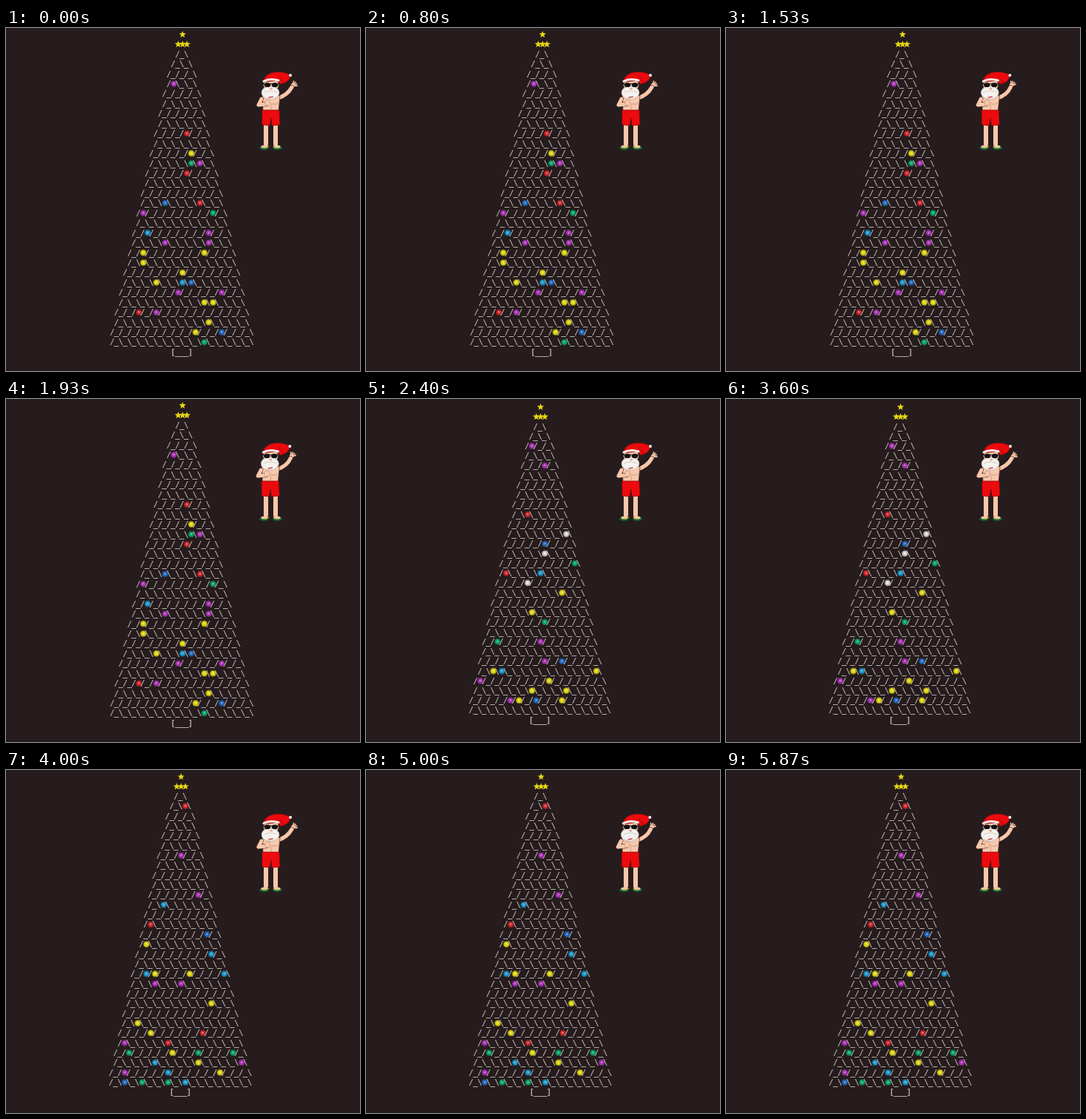
Write an HTML page with a canvas that moves like this. It is 478 by 464 pixels and loops after 5990 ms.

```html
<!DOCTYPE html>
<html lang="en">
<head>
<meta charset="utf-8">
<title>Christmas tree</title>
<style>
  html, body { margin: 0; width: 100%; height: 100%; overflow: hidden; background: #261c1d; }
  canvas { display: block; }
</style>
</head>
<body>
<canvas id="stage" width="478" height="464"></canvas>
<script>
const ctx = document.getElementById('stage').getContext('2d');
const LOOP = 5990, TREE_TIME = 2000, WAVE = 400;
const ROWS = 30, BAUBLE_CHANCE = 0.115;
const TEXT = '#b5acab', SKIN = '#f6c8ad', SHADE = '#c98e72', LINE = '#4a2318';
const RED = '#ec0a0e', WHITE = '#f4f1ee';

// Hue, saturation and lightness; yellow hangs most often
const YELLOW = [57, 85, 46], SKY = [198, 74, 44], BLUE = [213, 67, 43], GREEN = [157, 75, 34],
  RED_BALL = [358, 68, 46], PURPLE = [295, 55, 44], SILVER = [340, 6, 80];
const HUES = [YELLOW, YELLOW, YELLOW, YELLOW, SKY, SKY, PURPLE, PURPLE, PURPLE,
  GREEN, GREEN, RED_BALL, RED_BALL, BLUE, SILVER];

const TREES = [
  { seed: 11, x: 238.4, y: 35.2, pitch: 13.44 },
  { seed: 24, x: 235.7, y: 37, pitch: 13.24 },
  { seed: 37, x: 236.4, y: 35.4, pitch: 13.35 }
];

function seeded(seed) {
  return () => {
    seed = (seed + 0x6d2b79f5) | 0;
    let n = Math.imul(seed ^ (seed >>> 15), seed | 1);
    n ^= n + Math.imul(n ^ (n >>> 7), n | 61);
    return ((n ^ (n >>> 14)) >>> 0) / 2 ** 32;
  };
}

function ellipse(x, y, rx, ry, fill, line) {
  ctx.beginPath();
  ctx.ellipse(x, y, rx, ry, 0, 0, Math.PI * 2);
  ctx.fillStyle = fill;
  ctx.fill();
  if (line) {
    ctx.strokeStyle = line;
    ctx.lineWidth = 0.7;
    ctx.stroke();
  }
}

function star(x, y) {
  ctx.beginPath();
  for (let i = 0; i < 10; i++) {
    const r = i % 2 ? 2.1 : 4.9, a = i * Math.PI / 5;
    ctx.lineTo(x + r * Math.sin(a), y - r * Math.cos(a));
  }
  ctx.fillStyle = '#e6d814';
  ctx.fill();
}

function bauble(x, y, [h, s, l]) {
  const tone = k => `hsl(${h} ${s}% ${l * k}%)`;
  ellipse(x, y, 4.5, 4.5, tone(0.55));
  ellipse(x, y, 3.5, 3.5, tone(1));
  ellipse(x, y - 0.3, 1.4, 1.4, tone(1.45));
}

function drawTree({ seed, x, y, pitch }) {
  const random = seeded(seed), cell = pitch * 0.438;
  const put = (char, col, rowY) => {
    ctx.fillStyle = TEXT;
    ctx.fillText(char, x - 1 + col * cell, rowY + 3.5);
  };
  ctx.font = 'bold 11px "DejaVu Sans Mono", monospace';
  ctx.textAlign = 'center';

  star(x, y - 2 * pitch + 0.5);
  for (const col of [-1, 0, 1]) star(x + col * cell, y - pitch + 0.3);

  for (let row = 1; row <= ROWS; row++) {
    const edge = row === 1 ? 1 : Math.floor((row + 3) / 2);
    const rowY = y + (row - 1) * pitch;
    const slash = row % 2 ? '/' : '\\';
    put('/', -edge, rowY);
    for (let col = 1 - edge; col < edge; col++) {
      if ((col + edge) % 2 === 0) put(slash, col, rowY);
      else if (random() > BAUBLE_CHANCE) put('_', col, rowY);
      else bauble(x + col * cell, rowY, HUES[Math.floor(random() * HUES.length)]);
    }
    put('\\', edge, rowY);
  }
  [...'[___]'].forEach((char, i) => put(char, i - 2, y + ROWS * pitch));
}

function shape(path, fill, line = LINE, width = 0.7) {
  const p = new Path2D(path);
  if (fill) {
    ctx.fillStyle = fill;
    ctx.fill(p);
  }
  ctx.strokeStyle = line;
  ctx.lineWidth = width;
  ctx.stroke(p);
}

function limb(path, width) {
  shape(path, null, LINE, width + 1);
  shape(path, null, SKIN, width);
}

function hand(x, y, turn) {
  ctx.save();
  ctx.translate(x, y);
  ctx.rotate(turn);
  for (let i = -1; i <= 2; i++) {
    ctx.save();
    ctx.rotate(i * 0.45);
    limb('M0 0L0 -6', 1.7);
    ctx.restore();
  }
  ellipse(0, -1, 2.8, 3, SKIN);
  ctx.restore();
}

function drawSanta(raised) {
  ctx.save();
  ctx.lineJoin = ctx.lineCap = 'round';

  for (const side of [-1, 1]) {
    const x = 357.5 + side * 6.5;
    ellipse(x + side * 2.5, 162, 6.5, 3, '#1d6a35', '#123d21');
    limb(`M${x} 130L${x} 157`, 6);
    ellipse(x + side * 2, 160.5, 4.5, 2, SKIN);
    shape(`M${x - 3} 160L${x + side * 2} 162L${x + 4} 160`, null, '#d9c23a', 1);
  }
  if (raised) ctx.translate(-0.7, 0);

  // Torso, arms and shorts
  hand(raised ? 386 : 387, 78, raised ? 0.35 : 0.7);
  limb(`M367 95Q380 91 ${raised ? 385 : 386} 80`, 5);
  shape('M346 92L347 113L368 113L370 92Z', SKIN);
  shape('M358 102Q364 105 368 101M358 104L358 110', null, SHADE, 0.8);
  shape('M346 111L369 111L370 131L359 132L358 122L356 132L346 131Z', RED, '#7d090b');
  limb('M345 96L341 104L352 103', 5);
  ellipse(353, 101, 3.5, 4, SKIN, SHADE);

  // Head and beard
  ellipse(358, 77, 10.5, 9, SKIN, LINE);
  ellipse(357, 87.5, 12, 8.8, WHITE, '#b3aaa5');
  ellipse(358, 82, 2, 1.6, '#e9aa8f');
  shape('M349 87Q357 83 366 87', null, '#c7c0bb');
  shape('M355 94L360 93', null, '#cf443f', 1.6);
  for (const x of [353, 363]) ellipse(x, 77, 4.3, 3.1, '#151314');
  shape('M348 75.5L368 75.5', null, '#151314', 1.2);

  // Hat
  shape('M347 73Q350 60 366 59.5Q377 59 384 64Q383 74 370 76L368 71Z', RED, '#69100f');
  shape('M368 66Q374 69 375 74', null, '#9d090d', 0.9);
  shape('M348 72Q357 67.5 368 71', null, WHITE, 3);
  ellipse(384, 64, 2, 2, WHITE);
  ctx.restore();
}

function frame(now) {
  const t = now % LOOP;
  ctx.fillStyle = '#261c1d';
  ctx.fillRect(0, 0, 478, 464);
  drawTree(TREES[Math.floor(t / TREE_TIME)]);
  drawSanta(t % WAVE >= WAVE / 2);
  requestAnimationFrame(frame);
}
frame(0);
</script>
</body>
</html>
```
